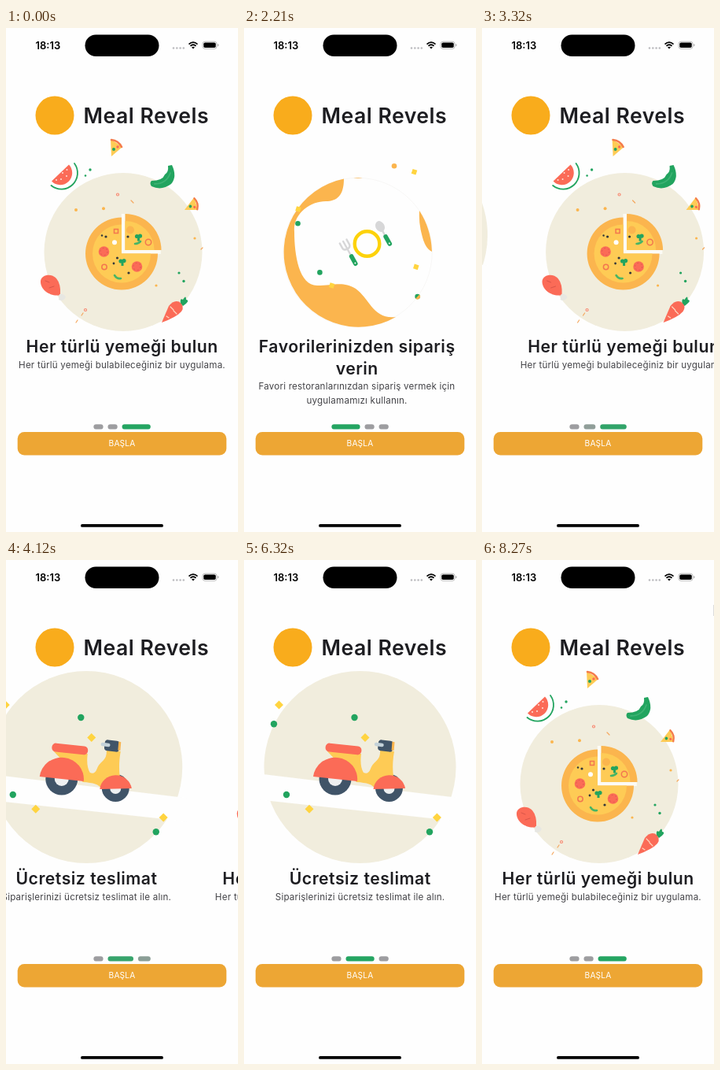
Write an HTML page that moves like this. It is 295x640 px and loops after 9.7 s.

```html
<!DOCTYPE html>
<html lang="tr">
<head>
<meta charset="utf-8">
<style>
html, body { margin: 0; width: 100%; height: 100%; overflow: hidden; background: #fefefe; }
svg { display: block; width: 295px; height: 640px; font-family: Inter, "Open Sans", sans-serif; }
.mid { text-anchor: middle; }
.head { font-size: 21.2px; font-weight: 600; letter-spacing: .5px; fill: #1d1d21; }
.body { font-size: 11.6px; letter-spacing: .2px; fill: #434347; }
.cream { fill: #f1eddd; }
.red { fill: #fb6b57; }
.green { fill: #22a45f; }
.amber { fill: #fbb54e; }
.yellow { fill: #fecb55; }
.gold { fill: #ffd440; }
.navy { fill: #405468; }
.line { fill: none; stroke-linecap: round; }
</style>
</head>
<body>
<svg viewBox="0 0 295 640">
  <defs>
    <rect id="sq" x="-3" y="-3" width="6" height="6" class="gold" transform="rotate(18)"/>
    <rect id="dia" x="-3.9" y="-3.9" width="7.8" height="7.8" class="gold" transform="rotate(45)"/>
    <g id="broc" class="green"><circle cx="-2" cy="-1" r="2.6"/><circle cx="2" cy="-1.4" r="2.6"/><path d="M-1.5 0h3v5h-3z"/></g>
    <g id="tom"><circle r="6.8" class="red"/><circle r="4.6" fill="none" stroke="#e05a4e" stroke-dasharray="2 2.8"/></g>
    <g id="slice"><path class="yellow" d="M0 0L15 10L1 22Z"/><path class="line" stroke="#f47b4b" stroke-width="2.6" d="M1 1Q10 2 14 10"/><circle class="red" cx="9" cy="10" r="1.7"/><circle class="green" cx="4" cy="13" r="2"/></g>
  </defs>

  <!-- status bar -->
  <text x="37.5" y="26.5" font-size="13" font-weight="600">18:13</text>
  <rect x="100.5" y="8.5" width="94" height="27.5" rx="13.75"/>
  <g fill="#bcbcbf"><circle cx="213" cy="25.5" r="1.3"/><circle cx="217.3" cy="25.5" r="1.3"/><circle cx="221.6" cy="25.5" r="1.3"/><circle cx="225.8" cy="25.5" r="1.3"/></g>
  <path d="M232.5 20.6Q238 15.6 243.5 20.6M234.5 22.9Q238 19.7 241.5 22.9" fill="none" stroke="#000" stroke-width="1.8"/>
  <path d="M236 24.4Q238 22.9 240 24.4L238 26.4Z"/>
  <rect x="250" y="17.2" width="18" height="9.2" rx="3" fill="none" stroke="#aaa" stroke-width=".8"/>
  <rect x="251.3" y="18.5" width="15.4" height="6.6" rx="1.8"/>
  <path d="M269.2 20v3.6q1.4-.5 1.4-1.8t-1.4-1.8" fill="#aaa"/>

  <circle cx="62" cy="111" r="24.5" fill="#f9ac1c"/>
  <text x="98.5" y="121" font-size="26.6" font-weight="600" letter-spacing=".5" fill="#1d1d21">Meal Revels</text>

  <g class="page">
    <circle cx="144.5" cy="285" r="94.7" fill="#fefefe" stroke="#f1efec" stroke-width=".5"/>
    <path class="amber" d="M127 191.5C127 213 118 220 104 220C84 220 62 236 64 259C64 288 70 327 93 327C114 327 126 321 142 331C160 344 164 370 193 367A95 95 0 1 1 127 191.5Z"/>
    <path class="amber" d="M223 232Q238 255 239 284Q230 280 226 262Q222 247 223 232ZM139 190.4q6-.8 12 0q-6 .8-12 0"/>
    <circle cx="156.5" cy="274" r="15.8" fill="#fefefe" stroke="#fdd20b" stroke-width="4.4"/>
    <g transform="translate(130 278) rotate(-29)">
      <path class="line" stroke="#d7d7d8" stroke-width="2.4" d="M-5-8v7q0 4 5 4t5-4v-7M0-8V12"/>
      <rect class="green" x="-2.8" y="11" width="5.6" height="16" rx="2.6"/><circle cy="23.5" r="1" fill="#fff"/>
    </g>
    <g transform="translate(173 252) rotate(-29)">
      <ellipse rx="5.6" ry="7.2" fill="#d7d7d8"/><path d="M-1.2 5h2.4v8h-2.4z" fill="#d7d7d8"/>
      <rect class="green" x="-2.8" y="12" width="5.6" height="16" rx="2.6"/><circle cy="24.5" r="1" fill="#fff"/>
    </g>
    <circle class="amber" cx="191" cy="175.3" r="3.3"/>
    <g class="green"><circle cx="68.5" cy="248.3" r="3.3"/><circle cx="96.4" cy="310.4" r="3.3"/><circle cx="220.6" cy="341" r="3.3"/></g>
    <path class="amber" d="M218.2 343.4a3.3 3.3 0 0 0 4.8-4.8z"/>
    <use href="#sq" transform="translate(216.5 182.8)"/><use href="#sq" transform="translate(69 230)"/><use href="#sq" transform="translate(218.8 303.4)"/><use href="#sq" transform="translate(111.6 327)"/>
    <g class="mid">
      <text class="head" x="143.7" y="412">Favorilerinizden sipariş</text><text class="head" x="143.7" y="439.5">verin</text>
      <text class="body" x="143.5" y="458.6">Favori restoranlarınızdan sipariş vermek için</text><text class="body" x="143.5" y="476.6">uygulamamızı kullanın.</text>
    </g>
  </g>

  <g class="page">
    <circle class="cream" cx="147.5" cy="263" r="122"/>
    <path d="M20 271.5L275 302.3V332L20 304.5Z" fill="#fefefe"/>
    <g class="green"><circle cx="38" cy="208.3" r="4.2"/><circle cx="140.5" cy="200" r="4.2"/><circle cx="54" cy="298" r="4.2"/><circle cx="236" cy="345.3" r="4.2"/></g>
    <use href="#dia" transform="translate(44.5 184)"/><use href="#dia" transform="translate(154 225.5)"/><use href="#dia" transform="translate(83 316.3)"/><use href="#dia" transform="translate(245.4 327)"/>
    <circle class="navy" cx="116" cy="278" r="20.5"/><circle cx="116" cy="278" r="9" fill="#eef0f1"/>
    <circle class="navy" cx="184.5" cy="289.5" r="17.5"/><circle cx="184.5" cy="290" r="7" fill="#eef0f1"/>
    <path class="yellow" d="M106 243L149 246Q147 262 152 270Q158 273 161 265C165 254 174 256 173 241L191 243Q188 260 190 275L166 290Q163 283 143 282Z"/>
    <path class="red" d="M88 275A28 27 0 0 1 144 281Z"/>
    <path class="red" d="M164.5 291A20.4 19.5 0 0 1 205 290Z"/>
    <rect class="red" x="-23" y="-5.5" width="46" height="11" rx="5" transform="translate(126.5 240) rotate(6)"/>
    <rect class="navy" x="-9.5" y="-7" width="19" height="14" rx="4" transform="translate(180 236) rotate(7)"/>
    <path class="amber" d="M188.5 230.5l3 .7-.9 10.8-3-.4z"/>
    <rect x="-6" y="-2.3" width="12" height="4.6" rx="2.3" fill="#c4d2d9" transform="translate(171.8 234.5) rotate(8)"/>
    <g class="mid"><text class="head" x="147.7" y="412">Ücretsiz teslimat</text><text class="body" x="147.5" y="431.6">Siparişlerinizi ücretsiz teslimat ile alın.</text></g>
  </g>

  <g class="page">
    <circle class="cream" cx="149" cy="284.5" r="100.5"/>
    <path d="M146.8 236h5v46h45v5h-50z" fill="#fcfbf5"/>
    <path class="amber" d="M147 286.5V240.5A46 46 0 1 0 193 286.5Z"/>
    <path class="yellow" d="M147 286.5V249.5A37 37 0 1 0 184 286.5Z"/>
    <path class="amber" d="M151.5 282V236A46 46 0 0 1 197.5 282Z"/>
    <path class="yellow" d="M151.5 282V245A37 37 0 0 1 188.5 282Z"/>
    <use href="#tom" transform="translate(124.5 284)"/><use href="#tom" transform="translate(166.5 303)"/>
    <circle class="amber" cx="158" cy="256.5" r="5"/><circle cx="138" cy="272.3" r="3" fill="#fff"/>
    <g class="line" stroke="#f3764f" stroke-width="1.5"><circle cx="125" cy="303.5" r="3.2"/><circle cx="181" cy="272" r="3.7"/><path d="M137.5 255.5h5v5h-5z"/></g>
    <g fill="#34383b"><circle cx="127" cy="265" r="1.6"/><circle cx="155" cy="265" r="1.6"/><circle cx="141.5" cy="292" r="1.6"/><circle cx="156" cy="311" r="1.6"/><circle cx="122" cy="263.5" r="1.2"/><circle cx="137" cy="299" r="1.4"/></g>
    <use href="#broc" transform="translate(168.5 265.5)"/><use href="#broc" transform="translate(148 297)"/>
    <path class="line" stroke="#48b565" stroke-width="2.6" d="M138 314q3 5 8 4M164 274q4 0 7-3"/>

    <use href="#slice" transform="translate(133 141)"/>
    <use href="#slice" transform="translate(239.3 215) rotate(40) scale(.92)"/>
    <path class="red" d="M58 194.5L80 173.5A15.2 15.2 0 0 1 58 194.5Z"/>
    <path class="line" stroke="#22a45f" stroke-width="1.8" d="M87 172A20.5 20.5 0 0 1 57.5 200"/>
    <g fill="#fde3da"><circle cx="72" cy="184" r="1"/><circle cx="77.5" cy="180" r="1"/><circle cx="77" cy="188" r="1"/><circle cx="70" cy="192" r="1"/><circle cx="64" cy="193" r="1"/></g>
    <path class="green" d="M206 175L211 174Q218 189 210 198Q198 207 185 201Q182 197 185 194Q199 194 202 186Q207 183 206 175Z"/>
    <path class="line" stroke="#3db273" stroke-width="1.8" d="M189 198Q204 198 209 184"/>
    <path class="red" d="M44 321C45 313 58 311 64 318Q70 325 69 339C58 342 43 333 44 321Z"/>
    <path class="line" stroke="#d95649" d="M50 321l5 2M55 330l6-2"/>
    <path d="M68 338q6-1 8 4q-4 6-9 3z" fill="#e7e7e2"/>
    <path class="green" d="M222 350Q221 342 225 345Q229 338 229 345Q235 346 225 353Z"/>
    <path class="red" d="M198 374L207 353Q213 345 220 347.5Q228 353 223 360Q217 367 198 374Z"/>
    <path class="line" stroke="#ffd5bf" stroke-width="1.2" d="M209 354l4 4M217 363l-4-4M204 366l3 2"/>
    <g class="amber"><circle cx="89" cy="231" r="2"/><circle cx="124" cy="229.3" r="2"/><circle cx="191" cy="327" r="1.6"/><circle cx="240" cy="267" r="1.6"/></g>
    <g class="green"><circle cx="107" cy="180" r="1.7"/><circle cx="220" cy="311" r="1.6"/><circle cx="226" cy="321.5" r="1.7"/><circle cx="101" cy="187.5" r="1.3"/></g>
    <g class="line" stroke="#f5a75d" stroke-width="1.2"><path d="M159 219l3 3M248 281l2-2M96 365l2-3M89 374l2-3"/><circle cx="142" cy="211.5" r="1.5" stroke="#f88a73"/><circle cx="101" cy="358" r="1.5" stroke="#f88a73"/></g>
    <g class="mid"><text class="head" x="147.7" y="412">Her türlü yemeği bulun</text><text class="body" x="147.5" y="431.6">Her türlü yemeği bulabileceğiniz bir uygulama.</text></g>
  </g>

  <g><rect class="dot"/><rect class="dot"/><rect class="dot"/></g>
  <rect x="14.7" y="513" width="265.6" height="29.6" rx="8.5" fill="#eda634"/>
  <text class="mid" x="147.5" y="531.2" font-size="10.2" letter-spacing=".15" fill="#fff">BAŞLA</text>
  <rect id="edge" x="294" y="57" width="1" height="14" fill="#dcdcdc"/>
  <rect x="95" y="630" width="105" height="3.8" rx="1.9"/>
</svg>
<script>
const LOOP = 9700, WIDTH = 295;
// start ms, end ms, steps, first page, last page, damping
const swipes = [
  [790, 1300, 5, 2, 1, 1.92],
  [1460, 1980, 5, 1, 0, 3],
  [2210, 2830, 6, 0, 1, 4],
  [3000, 3660, 6, 1, 2, 5.05],
  [3800, 4340, 5, 2, 1, 3],
  [4340, 5260, 8, 1, 0, 6],
  [5570, 6080, 5, 0, 1, 3],
  [6320, 6830, 5, 1, 2, 3]
];
const pages = document.querySelectorAll('.page');
const dots = document.querySelectorAll('.dot');
const edge = document.getElementById('edge');
const grey = [157, 157, 160], green = [36, 165, 98];

// The screen is refreshed in steps of about 100 ms while a swipe runs.
function position(t) {
  let p = 2;
  for (const [start, end, steps, from, to, damping] of swipes) {
    if (t < start) break;
    const k = Math.floor((t - start) / (end - start) * steps + .15);
    const u = Math.min(1, k / steps);
    p = from + (to - from) * (1 - (1 - u ** 1.5) ** damping);
  }
  return p;
}

function draw(t) {
  const p = position(t);
  pages.forEach((page, i) => page.setAttribute('transform', `translate(${(i - p) * WIDTH} 0)`));
  let x = 111.4;
  dots.forEach((dot, i) => {
    const on = Math.max(0, 1 - Math.abs(i - p));
    const width = 12.2 + 24 * on;
    const color = grey.map((c, j) => Math.round(c + (green[j] - c) * on));
    const attrs = { x, y: 503.3, width, height: 6.2, rx: 3.1, fill: `rgb(${color})` };
    for (const name in attrs) dot.setAttribute(name, attrs[name]);
    x += width + 5.9;
  });
  edge.setAttribute('opacity', t >= 7220 ? 1 : 0);
}

const began = performance.now();
function tick() {
  draw((performance.now() - began) % LOOP);
  requestAnimationFrame(tick);
}
tick();
</script>
</body>
</html>
```
